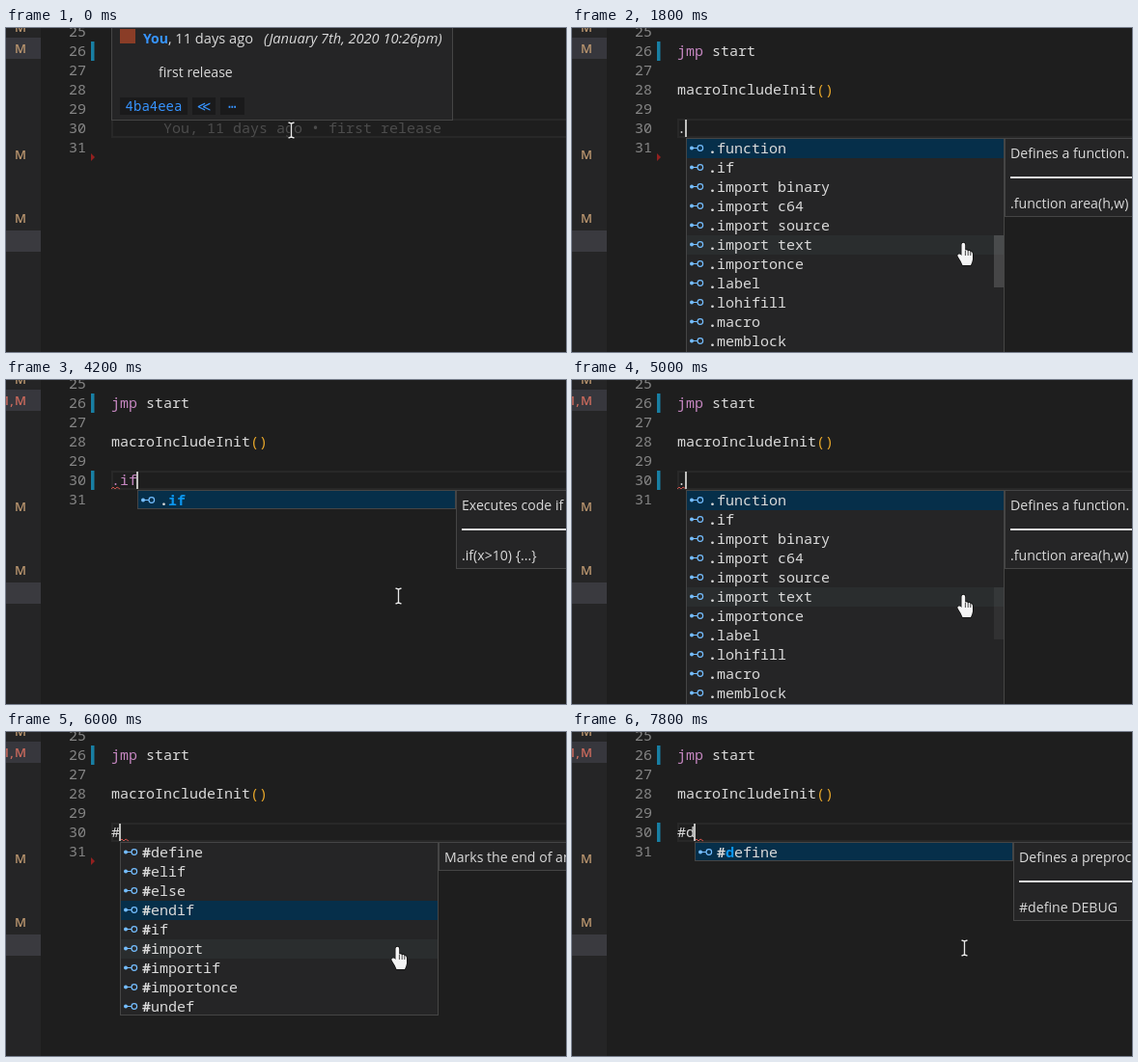
Recreate the animation shown at these times as an HTML page with a canvas. Size 580 px wide and 336 px high, loop 8 s.

```html
<!DOCTYPE html>
<html lang="en">
<head>
<meta charset="utf-8">
<title>Code completion</title>
<style>
  html, body { margin: 0; width: 100%; height: 100%; overflow: hidden; background: #1e1e1e; }
  canvas { display: block; width: 580px; height: 336px; }
</style>
</head>
<body>
<canvas id="stage" width="580" height="336"></canvas>
<script>
const ctx = document.getElementById('stage').getContext('2d');
const LOOP = 8000, STEP = 200, CHAR = 9, CODE_X = 109;
const MONO = '15px "Noto Sans Mono", monospace';
const MONO_MEDIUM = '500 ' + MONO;
const MONO_BOLD = 'bold ' + MONO;
const UI = '14.1px "Open Sans", sans-serif';
const HEADING = '14.6px "Open Sans", sans-serif';
const COLOR = {
  text: '#dadada', keyword: '#c586c0', bracket: '#e5a52a', panel: '#252526',
  border: '#454545', selected: '#062f4a', hovered: '#2a2d2e', match: '#0c97f0',
  link: '#3794ff', modified: '#187fa3', number: '#858585', ghost: '#4c4c4c',
  activeLine: '#282828'
};

const DIRECTIVES = ['.function', '.if', '.import binary', '.import c64', '.import source',
  '.import text', '.importonce', '.label', '.lohifill', '.macro', '.memblock', '.modify'];
const I_WORDS = DIRECTIVES.slice(1, 7);
const PREPROCESSOR = ['#define', '#elif', '#else', '#endif', '#if', '#import',
  '#importif', '#importonce', '#undef'];
const DOCS = {
  '.function': ['Defines a function.', '.function area(h,w) {...}'],
  '.if': ['Executes code if a condition is true.', '.if(x>10) {...}'],
  '.import binary': ['Imports a binary file.', '.import binary "a.bin"'],
  '.import c64': ['Imports a c64 file.', '.import c64 "a.prg"'],
  '.import source': ['Imports a source file.', '.import source "a.asm"'],
  '.import text': ['Imports a text file.', '.import text "a.txt"'],
  '.importonce': ['Imports the file once.', '.importonce'],
  '#define': ['Defines a preprocessor symbol.', '#define DEBUG'],
  '#endif': ['Marks the end of an #if block.']
};

// Each entry changes only the listed parts of the editor state.
const TIMELINE = [
  [0, { typed: '', caret: false, hover: true, ghost: true, list: null, sel: 0,
        scroll: 0, bar: false, error: null, problem: false }],
  [400, { hover: false, caret: true }],
  [800, { caret: false }],
  [1200, { caret: true }],
  [1800, { typed: '.', ghost: false, list: DIRECTIVES, scroll: 0.4 }],
  [2000, { bar: true, scroll: 0.2 }],
  [2200, { scroll: 0 }],
  [2600, { sel: 1, problem: true, error: 0 }],
  [2800, { sel: 2 }],
  [3000, { sel: 3 }],
  [3200, { sel: 4 }],
  [3400, { sel: 5 }],
  [3600, { sel: 6 }],
  [4000, { typed: '.i', list: I_WORDS, sel: 0 }],
  [4200, { typed: '.if', list: ['.if'] }],
  [4600, { typed: '.i', list: I_WORDS }],
  [4800, { typed: '.', list: DIRECTIVES, scroll: 0.4 }],
  [5000, { scroll: 0.14 }],
  [5200, { scroll: 0 }],
  [5400, { typed: '', list: null, error: null }],
  [5600, { bar: false }],
  [6000, { typed: '#', list: PREPROCESSOR, sel: 3, error: 1 }],
  [6200, { bar: true }],
  [6400, { typed: '#d', list: ['#define'], sel: 0, error: 2 }],
  [6600, { typed: '#de', error: 3 }],
  [7000, { typed: '#def' }],
  [7200, { error: 4 }],
  [7600, { typed: '#de', error: 3 }],
  [7800, { typed: '#d', error: 2 }]
];

const stateAt = time =>
  Object.assign({}, ...TIMELINE.filter(([start]) => start <= time).map(([, change]) => change));

function rect(x, y, w, h, color) {
  ctx.fillStyle = color;
  ctx.fillRect(x, y, w, h);
}

function text(string, x, y, color = COLOR.text, font = MONO_MEDIUM, align = 'left') {
  ctx.font = font;
  ctx.fillStyle = color;
  ctx.textAlign = align;
  ctx.fillText(string, x, y);
}

function panel(x, y, w, h) {
  rect(x, y, w, h, COLOR.border);
  rect(x + 1, y + 1, w - 2, h - 2, COLOR.panel);
}

function path(points, color, width) {
  ctx.beginPath();
  points.forEach(([x, y]) => ctx.lineTo(x, y));
  ctx.strokeStyle = color;
  ctx.lineWidth = width;
  ctx.stroke();
}

function drawSidebar(problem) {
  const font = '600 13px "Open Sans", sans-serif';
  rect(0, 0, 36, 336, COLOR.panel);
  rect(0, 10, 36, 22, '#37373d');
  rect(0, 210, 36, 22, '#3a3a3f');
  for (const y of [-1, 21, 131, 197]) {
    const failing = problem && y === 21;
    text(failing ? '1,\u200aM' : 'M', 21, y + 5, failing ? '#c9695c' : '#b8946e', font, 'right');
  }
}

function drawCode(s) {
  rect(CODE_X, 94, 471, 2, COLOR.activeLine);
  rect(CODE_X, 112, 471, 2, COLOR.activeLine);
  rect(CODE_X, 94, 2, 20, COLOR.activeLine);
  for (let n = 25; n <= 31; n++) text(n, 83, 9 + (n - 25) * 20, COLOR.number, MONO, 'right');

  rect(88, 14, 3.5, 20, COLOR.modified);
  if (s.bar) {
    rect(88, 94, 3.5, 20, COLOR.modified);
  } else {
    ctx.fillStyle = '#94201f';
    ctx.beginPath();
    ctx.moveTo(88, 130);
    ctx.lineTo(92, 134);
    ctx.lineTo(88, 138);
    ctx.fill();
  }

  text('jmp', CODE_X, 29, COLOR.keyword);
  text('start', CODE_X + 4 * CHAR, 29);
  text('macroIncludeInit', CODE_X, 69);
  text('()', CODE_X + 16 * CHAR, 69, COLOR.bracket);
  text(s.typed, CODE_X, 109, s.typed === '.if' ? COLOR.keyword : COLOR.text);
  if (s.ghost) text('You, 11 days ago • first release', 163, 109, COLOR.ghost, MONO);

  if (s.error !== null) {
    const x = CODE_X + s.error * CHAR;
    path([[x, 113], [x + 2, 111], [x + 4, 113], [x + 6, 111], [x + 9, 113]], '#c9504a', 1);
  }
  if (s.caret) rect(CODE_X + s.typed.length * CHAR - 1, 95, 2, 18, '#c0c0be');
}

function drawHover() {
  panel(109, -4, 354, 100);
  rect(118, 1, 16, 15, '#8a3d27');
  text('You', 142, 16, COLOR.link, 'bold ' + UI);
  text(', 11 days ago', 168, 16, COLOR.text, HEADING);
  text('(January 7th, 2020 10:26pm)', 267, 16, COLOR.text, 'italic ' + HEADING);
  text('first release', 158, 51, COLOR.text, UI);
  for (const [x, w, label] of [[118, 70, '4ba4eea'], [193, 24, '≪'], [222, 25, '⋯']]) {
    rect(x, 72, w, 18, '#1a1a1b');
    text(label, x + w / 2, 86, COLOR.link, '14px "Noto Sans Mono", "DejaVu Sans Mono", monospace', 'center');
  }
}

function drawIcon(x, y) {
  ctx.fillStyle = ctx.strokeStyle = '#75beff';
  ctx.lineWidth = 1.2;
  ctx.beginPath();
  ctx.arc(x + 2, y, 2, 0, 7);
  ctx.fill();
  ctx.beginPath();
  ctx.moveTo(x + 3, y);
  ctx.lineTo(x + 8, y);
  ctx.moveTo(x + 13.6, y);
  ctx.arc(x + 10.8, y, 2.8, 0, 7);
  ctx.stroke();
}

function drawLabel(label, matched, x, y) {
  text(label[0], x, y, COLOR.text, MONO_BOLD);
  text(label.slice(1, matched), x + CHAR, y, COLOR.match, MONO_BOLD);
  text(label.slice(matched), x + matched * CHAR, y);
}

function drawSuggestions({ typed, list, sel, scroll }) {
  const left = CODE_X + typed.length * CHAR, right = left + 330;
  panel(left, 114, 330, list.length * 20);
  list.forEach((label, i) => {
    const y = 115 + i * 20;
    const h = i === list.length - 1 ? 18 : 20;
    if (i === sel) rect(left + 1, y, 328, h, COLOR.selected);
    else if (i === 5) rect(left + 1, y, 328, h, COLOR.hovered);
    drawIcon(left + 4, y + 9.5);
    drawLabel(label, typed.length, left + 23, y + 15);
  });
  if (scroll) rect(right - 11, 215, 10, 54, `rgba(121,121,121,${scroll})`);

  const [summary, example] = DOCS[list[sel]];
  panel(right, 114, 340, example ? 82 : 30);
  text(summary, right + 6, 135, COLOR.text, UI);
  if (example) {
    rect(right + 6, 154, 324, 2, '#dcdcdc');
    text(example, right + 6, 187, COLOR.text, UI);
  }
}

function drawBeam(x, y) {
  const shape = [[-3, -8], [0, -7], [3, -8], [0, -7], [0, 7], [-3, 8], [0, 7], [3, 8]];
  const points = shape.map(([dx, dy]) => [x + 0.5 + dx, y + dy]);
  path(points, '#111', 3);
  path(points, '#e8e8e8', 1.4);
}

const HAND = new Path2D('M-2.5-10C-2.5-13 1.2-13 1.2-10V-4.5Q3-5.5 4.2-3.8Q6-4.5 7-3Q9-3.2 9-.5V5Q8.5 8 7 11H-1.5Q-3 7-6-2.5C-8 0-5-2-2.5 1Z'.replace('-6-2.5', '-6 2.5'));

function drawHand(x, y) {
  ctx.save();
  ctx.translate(x, y);
  ctx.strokeStyle = '#111';
  ctx.lineWidth = 1.5;
  ctx.stroke(HAND);
  ctx.fillStyle = '#f4f4f4';
  ctx.fill(HAND);
  ctx.restore();
  for (const dx of [1.4, 4.2, 6.8]) path([[x + dx, y - 4], [x + dx, y + 1]], '#333', 0.9);
}

function drawPointer(time, list) {
  if (list && list.length > 5) return drawHand(406, 235);
  const moved = Math.min(1, Math.floor(time / STEP) / 4);
  drawBeam(295 + 111 * moved, 106 + 118 * moved);
}

function draw(now) {
  const time = now % LOOP;
  const state = stateAt(time);
  rect(0, 0, 580, 336, '#1e1e1e');
  drawSidebar(state.problem);
  drawCode(state);
  if (state.hover) drawHover();
  if (state.list) drawSuggestions(state);
  drawPointer(time, state.list);
}

const start = performance.now();
function tick() {
  draw(performance.now() - start);
  requestAnimationFrame(tick);
}
tick();
</script>
</body>
</html>
```
